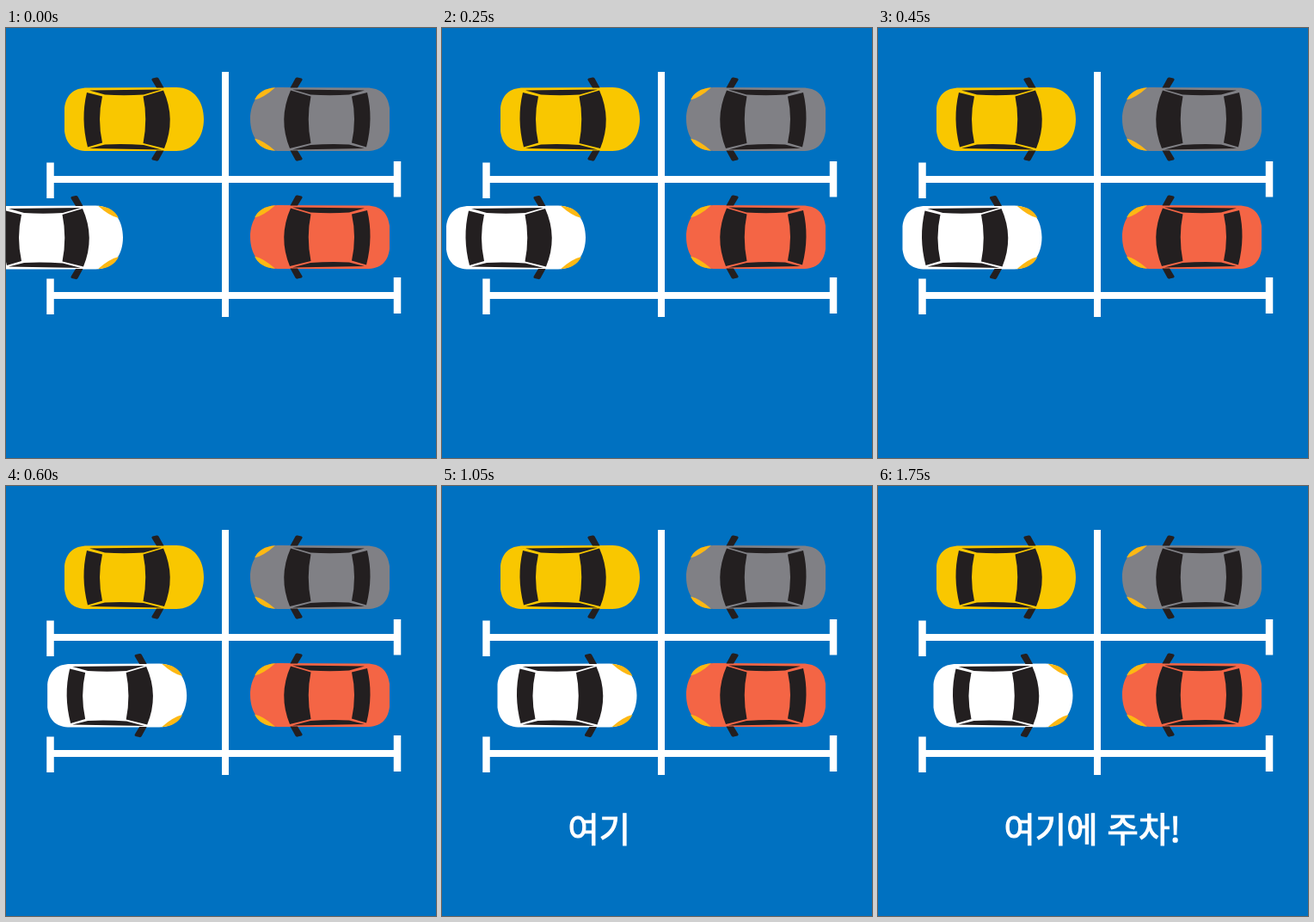
Animation of 500x500 px, one loop 2050 ms. Source, as an HTML page:

```html
<!DOCTYPE html>
<html lang="ko">
<head>
<meta charset="utf-8">
<title>Parking</title>
<style>
  html, body { margin: 0; width: 100%; height: 100%; overflow: hidden; background: #0071c1; }
  svg { display: block; width: 100%; height: 100%; }
  text {
    font: 500 39.5px "Noto Sans CJK KR", "Noto Sans CJK", sans-serif;
    fill: #fff; stroke: #fff; stroke-width: 1.2; white-space: pre;
  }
</style>
</head>
<body>
<svg viewBox="0 0 500 500">
  <defs>
    <!-- Car facing right; the body takes the fill of its <use> -->
    <path id="body" d="M68 93C70 78 78 69.500 95 69.500L198 69C219 69 230 86 230 106C230 126 219 143 198 143L95 143C78 143 70 135 68 120Z"/>
    <g id="glass" fill="#231f20">
      <path d="M94 75L112 79.500Q106 106 112 133.500L95 138.500Q86.500 106 94 75Z"/>
      <path d="M159.500 79.500L183 72.500Q198 106 184 140L159.500 134Q165 106 159.500 79.500Z"/>
      <path d="M97 72.500L181 71.500L160 77.500Q137 79 115 77.500Z"/>
      <path d="M97 140L115 135.500Q137 134.500 160 136L181 141.500Z"/>
      <path id="mirror" d="M169.500 60.500Q169 59 170.500 58.500L175 57.500Q176.500 57 177.500 58.500L183.500 69.500L175 69.500Z"/>
      <use href="#mirror" transform="matrix(1 0 0 -1 0 212)"/>
    </g>
    <g id="lamps" fill="#fdb813">
      <path id="lamp" d="M201 69.200Q219 70.500 225 83.500Q214 81 201 69.200Z"/>
      <use href="#lamp" transform="matrix(1 0 0 -1 0 212)"/>
    </g>
  </defs>

  <rect width="500" height="500" fill="#0071c1"/>

  <g fill="none" stroke="#fff">
    <path stroke-width="8" d="M255 51V336M51.500 176H455M51.500 311H455"/>
    <path stroke-width="8.500" d="M51.500 156.500V198M455 155V196.500M51.500 291.500V333M455 290V332"/>
  </g>

  <g>
    <use href="#body" fill="#f9c700"/>
    <use href="#glass"/>
  </g>
  <g transform="matrix(-1 0 0 1 514 0)">
    <use href="#body" fill="#808085"/>
    <use href="#lamps"/>
    <use href="#glass"/>
  </g>
  <g transform="matrix(-1 0 0 1 514 137)">
    <use href="#body" fill="#f46545"/>
    <use href="#lamps"/>
    <use href="#glass"/>
  </g>
  <g id="car">
    <use href="#body" fill="#fff"/>
    <use href="#lamps"/>
    <use href="#glass"/>
  </g>
  <text id="label" x="146.500" y="413.500"></text>
</svg>
<script>
  const LOOP = 2050, STEP = 50, TYPE_START = 750, KEY_TIME = 100;
  const path = [[0, -94], [250, -63], [450, -39.5], [550, -28], [700, -3.5]];
  // Syllables as they are composed, one key press at a time
  const typed = ["", "ㅇ", "여", "역", "여기", "여깅", "여기에", "여기에 ㅈ",
    "여기에 주", "여기에 줓", "여기에 주차", "여기에 주차!"];
  const car = document.getElementById("car");
  const label = document.getElementById("label");

  function carX(t) {
    for (let i = 1; i < path.length; i++) {
      const [t0, x0] = path[i - 1], [t1, x1] = path[i];
      if (t < t1) return x0 + (x1 - x0) * (t - t0) / (t1 - t0);
    }
    return path[path.length - 1][1];
  }

  function draw(t) {
    const stepped = Math.floor(t / STEP) * STEP;
    car.setAttribute("transform", `translate(${carX(stepped)} 137.5)`);
    const keys = Math.floor((t - TYPE_START) / KEY_TIME) + 1;
    label.textContent = typed[Math.max(0, Math.min(keys, typed.length - 1))];
  }

  let start;
  function tick(now) {
    start ??= now;
    draw(Math.max(0, now - start) % LOOP);
    requestAnimationFrame(tick);
  }
  draw(0);
  requestAnimationFrame(tick);
</script>
</body>
</html>
```
